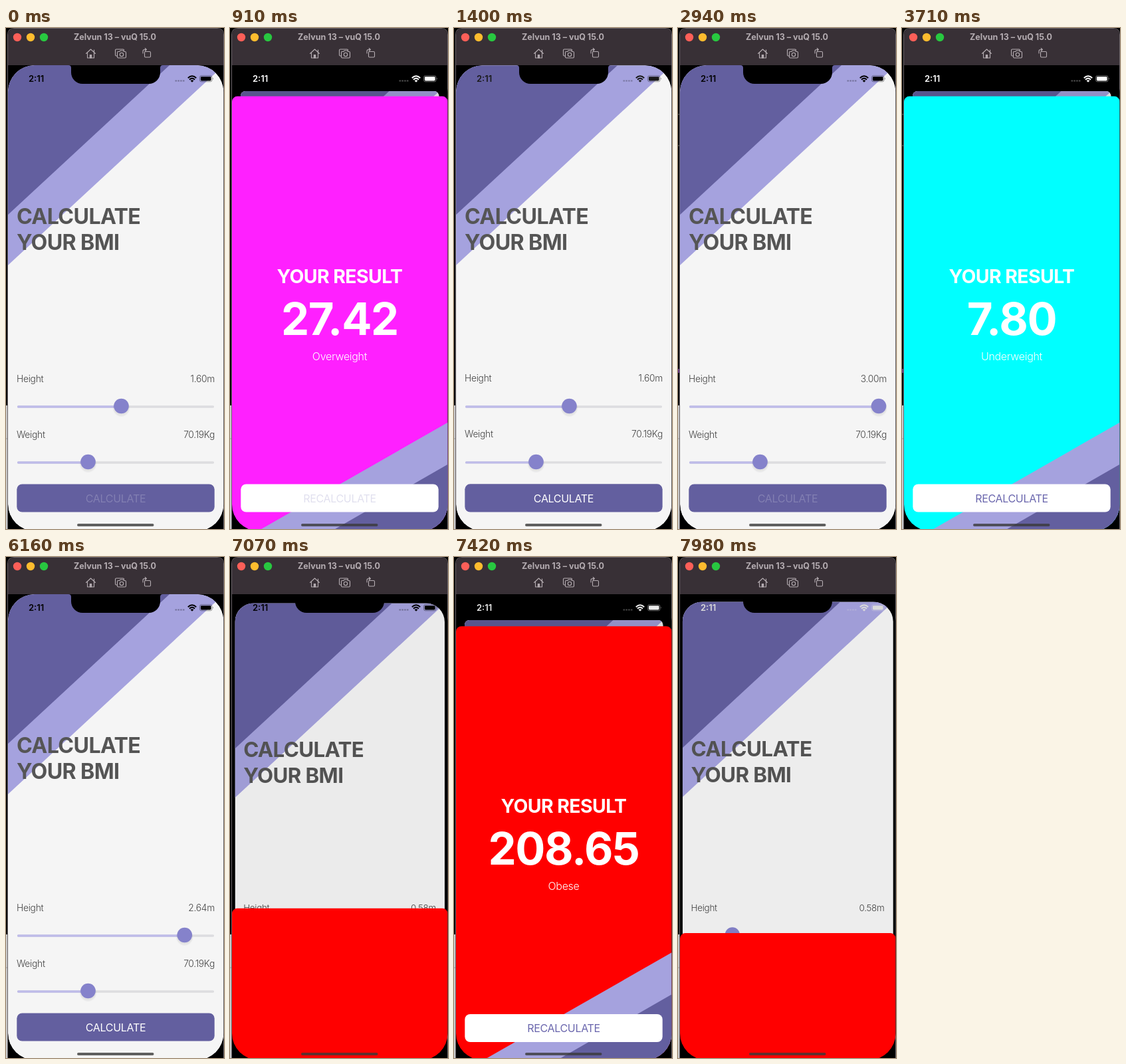
Animation of 328 by 754 pixels, one loop 8000 ms. Source, as an HTML page:

```html
<!DOCTYPE html>
<html lang="en">
<head>
<meta charset="utf-8">
<title>BMI calculator</title>
<style>
  html, body { margin: 0; width: 100%; height: 100%; overflow: hidden; background: #000; }
  svg { display: block; width: 328px; height: 754px; }
  text { font-family: Inter, "Open Sans", sans-serif; letter-spacing: -.02em; }
  .big { font-weight: 700; font-size: 32.2px; fill: #555; }
  .label { font-weight: 300; font-size: 13.8px; fill: #444; }
  .button { font-size: 16px; }
  .mid { text-anchor: middle; }
  .end { text-anchor: end; }
  .icon { fill: none; stroke: #b5adb2; stroke-width: 1.1; stroke-linejoin: round; stroke-linecap: round; }
</style>
</head>
<body>
<svg viewBox="0 0 328 754">
  <defs>
    <clipPath id="screenClip"><rect x="3" y="56" width="324.5" height="701" rx="40"/></clipPath>
    <clipPath id="cardClip"><rect id="cardShape" x="3" y="56" width="324.5" height="701"/></clipPath>
    <clipPath id="sheetClip"><rect x="3" y="102.800" width="324.5" height="680" rx="8"/></clipPath>
    <g id="thumb">
      <circle cy="3.5" r="12.5" fill="#000" opacity=".035"/>
      <circle cy="2" r="12" fill="#000" opacity=".04"/>
      <circle r="11.3" fill="#8582cb"/>
    </g>
  </defs>

  <!-- desktop behind the window -->
  <rect width="328" height="754"/>
  <path d="M0 568H2V754H0z" fill="#c8c8c8"/>
  <path d="M0 618H2" stroke="#999"/>
  <g id="marks">
    <path d="M0 130H2M0 177H2" stroke="#666"/>
    <path d="M0 513H2V519H0z" fill="#63357a"/>
  </g>

  <!-- window bar -->
  <path d="M2.5 754V10Q2.5 .5 12 .5H318Q327.5 .5 327.5 10V754" stroke="#6b656a"/>
  <path d="M3 56V10Q3 1 12 1H318Q327 1 327 10V56z" fill="#383036"/>
  <circle cx="17" cy="14" r="6.2" fill="#fe5f58"/>
  <circle cx="37" cy="14" r="6.2" fill="#febc2e"/>
  <circle cx="57" cy="14" r="6.2" fill="#28c840"/>
  <text class="mid" x="164" y="18" font-size="12.5" font-weight="700" fill="#b5adb2" style="letter-spacing:0">Zelvun 13 – vuQ 15.0</text>
  <g class="icon">
    <path d="M120.500 38.500L127.500 32L134.500 38.500M122.500 37.500V45H132.500V37.500M132.500 33V36"/>
    <path d="M126.300 45V40.500H128.700V45z" fill="#b5adb2"/>
    <path d="M167 42H166Q164.500 42 164.500 40.500V33.500Q164.500 32 166 32H176Q177.500 32 177.500 33.500V34"/>
    <path d="M168.500 35.500H171L172 34H176.500L177.500 35.500H179Q180.500 35.500 180.500 37V43.500Q180.500 45 179 45H169Q167.500 45 167.500 43.500V37Q167.500 35.500 168.500 35.500z"/>
    <circle cx="174" cy="40" r="2.700"/>
    <rect x="208.500" y="35.500" width="9" height="8.500" rx="1.500"/>
    <path d="M206 38V35Q206 32.500 208.500 32.500H211M209.300 30.500L211.300 32.500L209.300 34.500"/>
  </g>

  <g clip-path="url(#screenClip)">
    <rect x="3" y="56" width="325" height="701"/>

    <!-- calculator page -->
    <g id="card" clip-path="url(#cardClip)">
      <rect x="3" y="56" width="325" height="701" fill="#f5f5f5"/>
      <path d="M3 56H328L3 357z" fill="#a5a2de"/>
      <path d="M3 56H246L3 281z" fill="#635f9f"/>
      <text class="big" x="16" y="294.500">CALCULATE</text>
      <text class="big" x="16" y="334">YOUR BMI</text>
      <text class="label" x="16" y="532.500">Height</text>
      <text class="label end" id="height" x="314" y="532.500"></text>
      <text class="label" x="16" y="616.500">Weight</text>
      <text class="label end" x="314" y="616.500">70.19Kg</text>
      <g stroke-width="3.300" stroke-linecap="round">
        <path d="M18.500 570H311.500M18.500 654H311.500" stroke="#dddde0"/>
        <path id="fill" stroke="#bfbce9"/>
        <path d="M18.500 654H123.500" stroke="#bfbce9"/>
      </g>
      <use id="knob" href="#thumb" y="569"/>
      <use href="#thumb" x="123.500" y="653"/>
      <rect x="16.300" y="686.400" width="297.400" height="42.200" rx="8" fill="#635f9f"/>
      <text class="button mid" id="calc" x="165" y="714" fill="#fff">CALCULATE</text>
      <rect id="dim" x="3" y="56" width="325" height="701"/>
    </g>

    <!-- result sheet -->
    <g id="sheet"><g clip-path="url(#sheetClip)">
      <rect id="paper" x="3" y="102" width="325" height="680"/>
      <path d="M328 593.500V757H42z" fill="#a5a2de"/>
      <path d="M328 656.500V757H153z" fill="#635f9f"/>
      <g class="mid" fill="#fff">
        <text x="165" y="384" font-size="28.4" font-weight="700">YOUR RESULT</text>
        <text id="bmi" x="165" y="462" font-size="67" font-weight="700"></text>
        <text id="verdict" x="165" y="500" font-size="16" font-weight="300"></text>
      </g>
      <rect x="16.300" y="686.400" width="297.400" height="42.200" rx="8" fill="#fff"/>
      <text class="button mid" id="recalc" x="165" y="714" fill="#6a66ad">RECALCULATE</text>
    </g></g>

    <!-- system overlay -->
    <path d="M94 56Q98 56 98 60V67A17 17 0 0 0 115 84H215A17 17 0 0 0 232 67V60Q232 56 236 56z"/>
    <g id="status">
      <text x="34" y="81.300" font-size="13" font-weight="600" style="letter-spacing:0">2:11</text>
      <path d="M254.500 79.500h2.600m1.200 0h2.600m1.200 0h2.600m1.200 0h2.600" stroke="currentColor" stroke-width="2" opacity=".3"/>
      <path d="M273.800 75.200Q280 69.300 286.200 75.200M276 77.700Q280 73.900 284 77.700" fill="none" stroke="currentColor" stroke-width="2"/>
      <path d="M277.600 79.300Q280 77 282.400 79.300L280 81.700z"/>
      <rect x="291.500" y="71.800" width="18.500" height="9" rx="2.500" fill="none" stroke="currentColor" stroke-opacity=".4"/>
      <rect x="292.900" y="73.200" width="15.700" height="6.200" rx="1.400"/>
      <path d="M311.200 74.800Q313 76.300 311.200 77.800z" opacity=".5"/>
    </g>
    <rect x="107" y="746" width="115.500" height="4" rx="2" fill="#3a3a3a" opacity=".8"/>
  </g>
</svg>
<script>
const LOOP = 8000, WEIGHT = 70.19, SLIDE = 600;
const $ = id => document.getElementById(id);
const set = (id, attrs) => { for (const k in attrs) $(id).setAttribute(k, attrs[k]); };
const clamp = v => Math.min(1, Math.max(0, v));

const visits = [
  { open: 50, close: 945, verdict: 'Overweight', color: '#ff20ff' },
  { open: 3045, close: 4165, verdict: 'Underweight', color: '#0ff' },
  { open: 6950, close: 7762, verdict: 'Obese', color: '#f00' }
];
const calcPresses = [[-100, 50], [2935, 3045], [6855, 6950]];
const recalcPresses = [[695, 945], [3915, 4165], [7600, 7762]];
// time, height in metres
const heights = [[0, 1.6], [2065, 1.6], [2310, 3], [5915, 3], [6020, 2.85], [6125, 2.85], [6510, .58]];

// spring-like settle with a finite end
function settle(ms) {
  const u = clamp(ms / SLIDE);
  return 1 - (1 - u) ** 5 * (1 + 5 * u);
}

const lift = (v, t) => settle(t - v.open) - settle(t - v.close);

function heightAt(t) {
  let [t0, h0] = heights[0];
  for (const [t1, h1] of heights) {
    if (t < t1) return h0 + (h1 - h0) * (t - t0) / (t1 - t0);
    [t0, h0] = [t1, h1];
  }
  return h0;
}

// dims at once, fades back after release
function pressOpacity(presses, t) {
  const last = presses.filter(p => p[0] <= t).pop();
  return last ? .2 + .8 * clamp((t - last[1]) / 250) : 1;
}

function draw(t) {
  const visit = visits.filter(v => v.open <= t).pop() || visits[0];
  const p = lift(visit, t), h = heightAt(t), x = 26.6 + 91.8 * h;

  $('height').textContent = h.toFixed(2) + 'm';
  set('fill', { d: `M18.5 570H${x}` });
  set('knob', { x });
  set('calc', { opacity: pressOpacity(calcPresses, t) });
  set('recalc', { opacity: pressOpacity(recalcPresses, t) });

  const scale = 1 - .08 * p;
  set('card', { transform: `translate(165 ${56 + 39 * p}) scale(${scale}) translate(-165 -56)` });
  set('cardShape', { rx: 40 - 32 * p });
  set('dim', { opacity: .11 * p });

  set('sheet', { transform: `translate(0 ${654 * (1 - p)})` });
  set('paper', { fill: visit.color });
  $('bmi').textContent = (WEIGHT / heightAt(visit.open) ** 2).toFixed(2);
  $('verdict').textContent = visit.verdict;

  // the status bar tint trails the sheet
  const g = Math.round(255 * clamp(lift(visit, t - 150)));
  const tint = `rgb(${g},${g},${g})`;
  set('status', { fill: tint, color: tint });
  set('marks', { opacity: t >= 2450 && t < 5390 ? 1 : 0 });
}

const start = performance.now();
function frame() {
  draw((performance.now() - start) % LOOP);
  requestAnimationFrame(frame);
}
frame();
</script>
</body>
</html>
```
